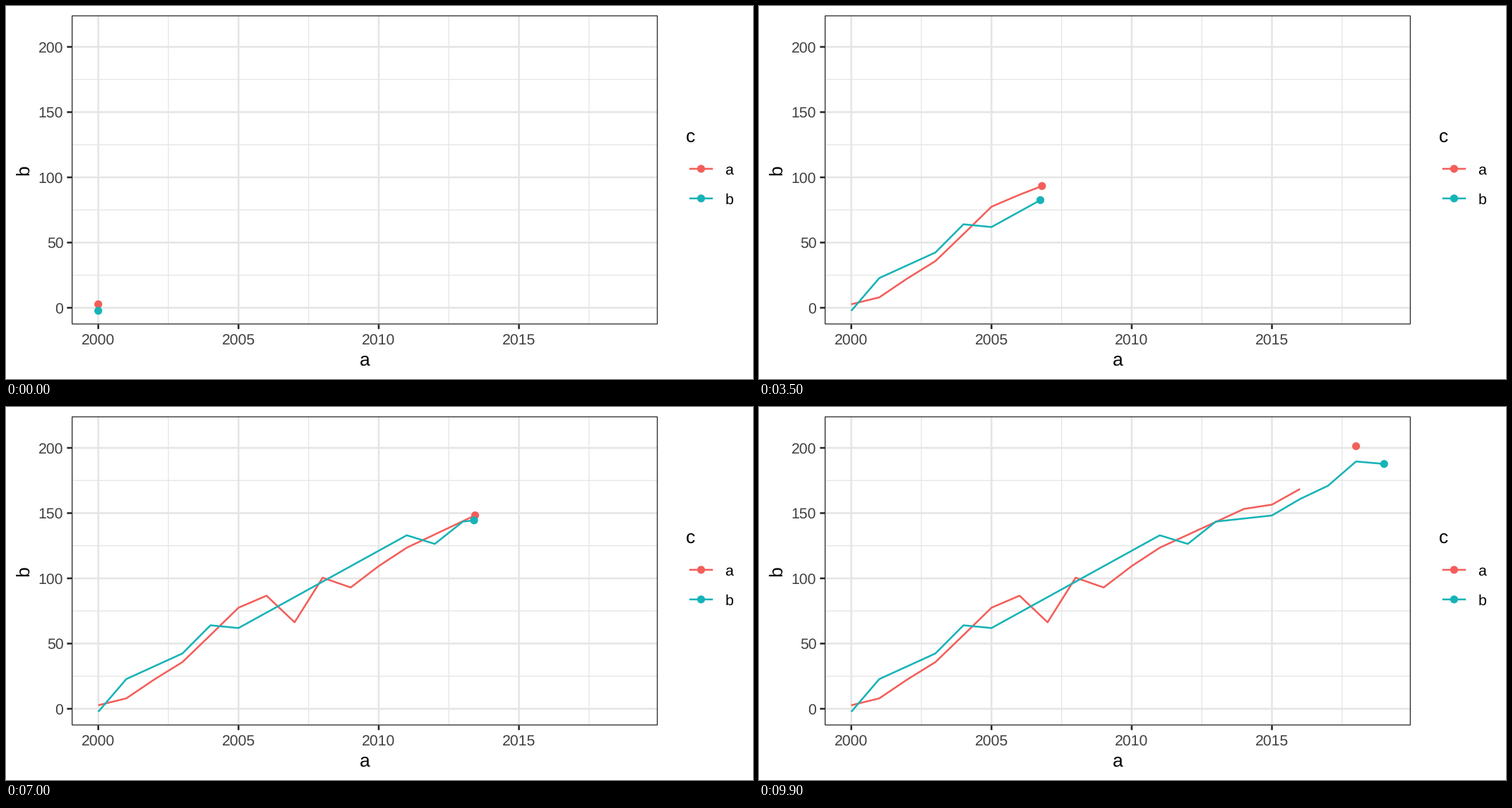
Recreate the animation shown at these times as a matplotlib script. Size 1058 by 529 pixels, loop 10000 ms.

```python
import math

import matplotlib.pyplot as plt
from matplotlib.animation import FuncAnimation

W, H, DPI = 1058, 529, 64
PT = 72 / DPI  # points per pixel
FRAMES, INTERVAL = 100, 100
YEARS = 19

COLORS = {"a": "#F35E5A", "b": "#17B3B7"}
GRID, FRAME, GREY = "#E5E5E5", "#262626", "#404040"
LEFT, RIGHT, TOP, BOTTOM = 93.0, 923.1, 13.3, 451.6
THICK, THIN, RADIUS = 2.56, 1.28, 5.6
SMALL, LARGE = 21.2, 26.4

# Two values a year and the series each belongs to. Where one series owns
# both, its line heads for the first and snaps to the second on arrival.
OWNERS = "ab ab aa ab ab ab aa aa aa aa aa ab bb bb aa ab ab bb ab bb".split()
VALUES = [2.7, -2.3, 8, 22.8, 41, 22.5, 35.8, 42.4, 56.5, 64,
          77.5, 61.9, 57, 86.7, 95, 66.3, 88, 100.5, 95, 93,
          97, 109.4, 123.5, 133, 128, 126.4, 134, 143.5, 154, 153.2,
          156.5, 148.2, 168.5, 160.8, 197, 171, 201.3, 189.6, 213, 187.7]

plt.rcParams["font.family"] = "Liberation Sans"
plt.rcParams["text.hinting"] = "none"

fig = plt.figure(figsize=(W / DPI, H / DPI), dpi=DPI, facecolor="white")
ax = fig.add_axes([0, 0, 1, 1])
ax.set_xlim(0, W)
ax.set_ylim(H, 0)
ax.axis("off")


def px(year):
    return 130.7 + 39.72 * year


def py(value):
    return 428 - 1.85 * value


def stroke(xs, ys, color, width, z=1):
    line, = ax.plot(xs, ys, color=color, lw=width * PT, zorder=z, snap=False,
                    solid_capstyle="butt", solid_joinstyle="round")
    return line


def dot(x, y, color):
    return ax.add_patch(plt.Circle((x, y), RADIUS, fc=color, lw=0, zorder=6))


def label(x, y, text, size, color="black", ha="center", rotation=0):
    ax.text(x, y, text, fontsize=size * PT, color=color, ha=ha, va="baseline",
            rotation=rotation, rotation_mode="anchor")


def draw_grid():
    for k in range(4):
        stroke([px(5 * k + 2.5)] * 2, [TOP, BOTTOM], GRID, THIN)
        stroke([LEFT, RIGHT], [py(50 * k + 25)] * 2, GRID, THIN)
    for year in range(0, 20, 5):
        x = px(year)
        stroke([x, x], [TOP, BOTTOM], GRID, THICK, 2)
        stroke([x, x], [BOTTOM, BOTTOM + 6.6], FRAME, THICK, 2)
        label(x, 479.5, str(2000 + year), SMALL, GREY)
    for value in range(0, 201, 50):
        y = py(value)
        stroke([LEFT, RIGHT], [y, y], GRID, THICK, 2)
        stroke([LEFT - 6.6, LEFT], [y, y], FRAME, THICK, 2)
        label(81.3, y + 7.6, str(value), SMALL, GREY, "right")


def draw_frame():
    h = THIN / 2
    x0, x1, y0, y1 = LEFT + h, RIGHT - h, TOP + h, BOTTOM - h
    ax.add_patch(plt.Rectangle((x0, y0), x1 - x0, y1 - y0, fill=False,
                               ec=FRAME, lw=THIN * PT, zorder=7, snap=False))
    label(508, 511, "a", LARGE)
    label(33, 233, "b", LARGE, rotation=90)


def draw_legend():
    label(963, 193.5, "c", LARGE, ha="left")
    for k, (name, color) in enumerate(COLORS.items()):
        y = 230.9 + 42 * k
        stroke([967.8, 1001.2], [y, y], color, THICK, 5)
        dot(984.5, y, color)
        label(1018.5, y + 8, name, SMALL, ha="left")


def rows_of(name):
    owners = "".join(OWNERS)
    return [(n // 2, v) for n, v in enumerate(VALUES) if owners[n] == name]


def key(year):
    return math.floor(year * (FRAMES - 1) / YEARS + 0.5)


def trace(rows, i):
    """Line points and dot position of one series at frame i."""
    k = max(n for n, (year, _) in enumerate(rows) if key(year) <= i)
    passed = dict(rows[:k + 1])
    year, value = rows[k]
    start = key(year)
    if k + 1 < len(rows):
        next_year, next_value = rows[k + 1]
        f = (i - start) / (key(next_year) - start)
        year += (next_year - year) * f
        value += (next_value - value) * f
        passed[year] = value
    elif i > start:
        passed.pop(year)  # a finished series loses its last segment
    return passed, (year, value)


draw_grid()
draw_frame()
draw_legend()
series = [(rows_of(name), stroke([], [], color, THICK, 4), dot(0, 0, color))
          for name, color in COLORS.items()]


def update(i):
    for rows, line, mark in series:
        points, (year, value) = trace(rows, i)
        line.set_data([px(t) for t in points], [py(v) for v in points.values()])
        mark.center = px(year), py(value)
    return [artist for _, *pair in series for artist in pair]


anim = FuncAnimation(fig, update, frames=FRAMES, interval=INTERVAL,
                     init_func=lambda: update(0), repeat=True, repeat_delay=0)
plt.show()
```
